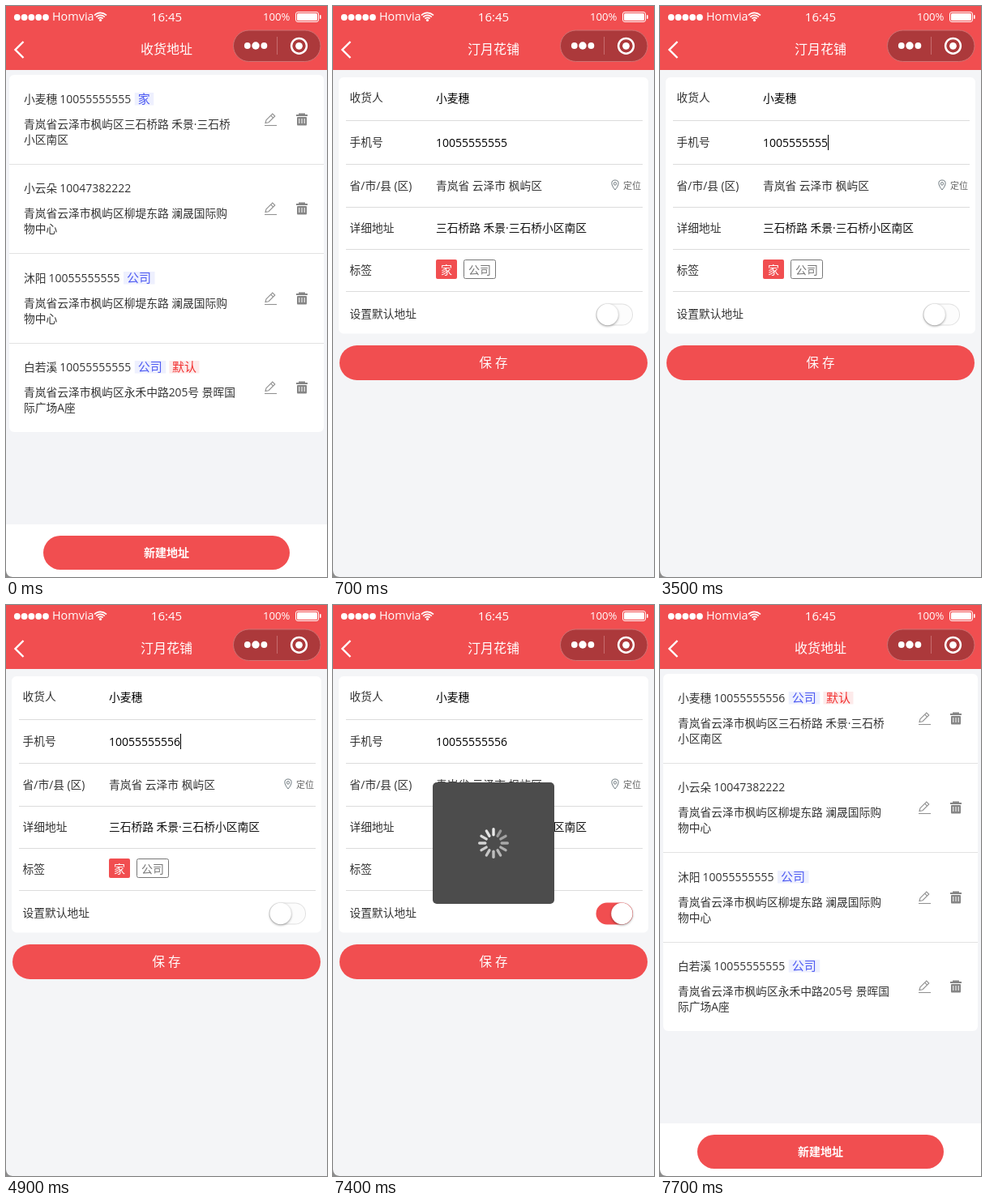
Recreate the animation shown at these times as an HTML page with a canvas. Size 396 px wide and 705 px high, loop 8000 ms.

```html
<!DOCTYPE html>
<html lang="zh-CN">
<head>
<meta charset="utf-8">
<title>收货地址</title>
<style>
html, body { margin: 0; width: 100%; height: 100%; overflow: hidden; }
canvas { display: block; width: 396px; height: 705px; }
</style>
</head>
<body>
<canvas id="stage"></canvas>
<script>
const W = 396, H = 705, LOOP = 8000;
const RED = '#f14e50', INK = '#333', PAPER = '#f3f4f7';
const FONT = '"Open Sans", "Noto Sans CJK SC", "Noto Sans CJK", sans-serif';
const canvas = document.getElementById('stage');
const dpr = window.devicePixelRatio || 1;
canvas.width = W * dpr;
canvas.height = H * dpr;
const c = canvas.getContext('2d');

const REGION = ['青岚省', '云泽市', '枫屿区'];
const AREA = REGION.join('');
const PHONE = '1005555555', OLD = PHONE + '5', NEW = PHONE + '6';

// cy is the optical middle of the line
function text(s, x, cy, size, color = INK, align = 'left', weight = 400) {
  c.font = `${weight} ${size}px ${FONT}`;
  c.textAlign = align;
  c.fillStyle = color;
  c.fillText(s, x, cy + size * 0.37);
}

function rect(x, y, w, h, color) {
  c.fillStyle = color;
  c.fillRect(x, y, w, h);
}

function round(x, y, w, h, r, fill, stroke) {
  c.beginPath();
  c.roundRect(x, y, w, h, r);
  if (fill) { c.fillStyle = fill; c.fill(); }
  if (stroke) { c.strokeStyle = stroke; c.lineWidth = 1; c.stroke(); }
}

function dot(x, y, r, color) {
  c.beginPath();
  c.arc(x, y, r, 0, Math.PI * 2);
  c.fillStyle = color;
  c.fill();
}

function line(points, color, width) {
  c.beginPath();
  points.forEach(([x, y], i) => i ? c.lineTo(x, y) : c.moveTo(x, y));
  c.strokeStyle = color;
  c.lineWidth = width;
  c.stroke();
}

function statusBar() {
  for (let i = 0; i < 5; i++) dot(13.8 + i * 8.8, 14, 3.9, '#fff');
  text('Homvia', 57, 12.8, 14.4, '#fff');
  c.strokeStyle = '#fff';
  c.lineWidth = 1.7;
  for (const r of [4.2, 7.2, 10.2]) {
    c.beginPath();
    c.arc(116.5, 18.5, r, -Math.PI * 0.76, -Math.PI * 0.24);
    c.stroke();
  }
  dot(116.5, 17.5, 1.6, '#fff');
  text('16:45', 198, 13, 15, '#fff', 'center');
  text('100%', 317, 13.2, 13.2, '#fff');
  round(357.5, 7.5, 28, 12, 2.5, null, '#fff');
  round(359, 9, 25, 9, 1.5, '#fff');
  round(387, 11, 1.6, 5, 0.8, '#fff');
}

function header(title) {
  rect(0, 0, W, 79, RED);
  statusBar();
  line([[21.5, 44], [11.5, 54], [21.5, 64]], '#fff', 2.4);
  text(title, 198, 53.5, 16, '#fff', 'center');
  round(280.5, 30, 107.5, 38.5, 19.2, '#ac393b', '#cf7172');
  dot(297.8, 49, 3.9, '#fff');
  dot(308, 49, 4.7, '#fff');
  dot(318.4, 49, 3.9, '#fff');
  rect(334, 38, 1, 22, '#c66d6e');
  c.beginPath();
  c.arc(361.5, 49.3, 9.4, 0, Math.PI * 2);
  c.strokeStyle = '#fff';
  c.lineWidth = 2.5;
  c.stroke();
  dot(361.5, 49.3, 4.4, '#fff');
}

function pencil(x, y) {
  const g = '#929292';
  line([[x - 7, y + 7.5], [x + 8, y + 7.5]], g, 1.1);
  c.beginPath();
  c.moveTo(x - 6, y + 4.5);
  c.lineTo(x - 5, y + 0.8);
  c.lineTo(x + 2.8, y - 7);
  c.lineTo(x + 5.8, y - 4);
  c.lineTo(x - 2, y + 3.7);
  c.closePath();
  c.stroke();
  line([[x + 0.6, y - 4.8], [x + 3.6, y - 1.8]], g, 1.1);
}

function trash(x, y) {
  const g = '#858585';
  rect(x - 4, y - 7.5, 8, 2, g);
  rect(x - 7, y - 6, 14, 2, g);
  round(x - 6, y - 3, 12, 10.5, 1, g);
  for (const d of [-3.2, 0, 3.2]) rect(x + d - 0.5, y - 1, 1, 6, '#fff');
}

function badge(s, x, y) {
  const hot = s === '默认';
  const w = hot ? 37 : s.length * 15 + 8.5;
  rect(x, y - 8, w, 15.5, hot ? '#fdeaea' : '#eef0fe');
  text(s, x + (hot ? 3.5 : 4), y - 0.5, 15, hot ? '#f23232' : '#4f5cf2');
}

function listPage(saved) {
  const rows = [
    ['小麦穗', saved ? NEW : OLD, saved ? ['公司', '默认'] : ['家'],
      AREA + '三石桥路 禾景·三石桥', '小区南区'],
    ['小云朵', '10047382222', [], AREA + '柳堤东路 澜晟国际购', '物中心'],
    ['沐阳', OLD, ['公司'], AREA + '柳堤东路 澜晟国际购', '物中心'],
    ['白若溪', OLD, saved ? ['公司'] : ['公司', '默认'],
      AREA + '永禾中路205号 景晖国', '际广场A座']
  ];
  rect(0, 79, W, H - 79, PAPER);
  round(4, 85, 388, 441, 6, '#fff');
  rows.forEach(([name, phone, tags, first, second], i) => {
    const top = 85 + i * 110.4, y = Math.round(top);
    if (i) rect(4, Math.floor(top), 388, 1, '#e2e2e2');
    text(name, 22, y + 30, 13.75);
    const px = 25 + name.length * 13.75;
    text(phone, px, y + 29.5, 14);
    tags.forEach((s, k) => badge(s, px + 92.5 + k * 42.7, y + 30));
    text(first, 22, y + 60.5, 13.75);
    text(second, 22, y + 79.5, 13.75);
    pencil(326, y + 55);
    trash(365, y + 55);
  });
  rect(0, 640, W, 65, '#fff');
  round(46, 654, 304, 42, 21, RED);
  text('新建地址', 198, 675, 14, '#fff', 'center', 700);
}

function pin(x, y) {
  c.beginPath();
  c.moveTo(x, y + 6);
  c.bezierCurveTo(x - 6, y - 1, x - 5, y - 6, x, y - 6);
  c.bezierCurveTo(x + 5, y - 6, x + 6, y - 1, x, y + 6);
  c.strokeStyle = '#6f7a80';
  c.lineWidth = 1;
  c.stroke();
  c.beginPath();
  c.arc(x, y - 1.6, 1.7, 0, Math.PI * 2);
  c.stroke();
}

function choice(s, x, w, on) {
  if (on) round(x, 313, w, 24, 2, RED);
  else round(x + 0.5, 313.5, w - 1, 23, 2, '#fff', '#777');
  text(s, x + w / 2, 325.5, 14, on ? '#fff' : '#777', 'center');
}

function toggle(p) {
  const on = p > 0;
  round(324.5, 367.5, 45.5, 27, 13.5, on ? RED : '#e0e0e0');
  if (p < 1) {
    const k = 1 - p;
    c.save();
    c.translate(347.25, 381);
    c.scale(k, k);
    round(-21.8, -12.6, 43.6, 25.2, 12.6, '#fcfcfc');
    c.restore();
  }
  c.save();
  c.shadowColor = 'rgba(0,0,0,.4)';
  c.shadowBlur = 3 * dpr;
  c.shadowOffsetY = dpr;
  dot(338.7 + p * 17.7, 381, 13.2, '#fff');
  c.restore();
}

function formPage({ phone, caret, office, knob }) {
  rect(0, 79, W, H - 79, '#f4f5f7');
  round(7, 88, 382, 316.5, 6, '#fff');
  const rows = [['收货人', 113], ['手机号', 168], ['省/市/县 (区)', 222],
    ['详细地址', 274], ['标签', 326], ['设置默认地址', 379.5]];
  for (const [s, y] of rows) text(s, 20.6, y, 13.75);
  for (const y of [141, 195, 248, 300, 352]) rect(16, y, 366, 1, '#dcdcdc');
  text('小麦穗', 127, 114, 13.75, '#000');
  text(phone, 127, 168.5, 14, '#000');
  if (caret) rect(127 + phone.length * 8, 159, 1, 19, '#000');
  text(REGION.join(' '), 127, 222, 13.75);
  text('三石桥路 禾景·三石桥小区南区', 127, 273.5, 13.75, '#111');
  pin(348, 221);
  text('定位', 358, 222, 11, '#666');
  choice('家', 127, 26, !office);
  choice('公司', 161, 40, office);
  toggle(knob);
  round(8, 419, 380, 43, 21.5, RED);
  text('保 存', 198, 440.5, 15.5, '#fff', 'center');
}

function loading(turn) {
  round(123, 219, 150, 150, 5, '#4c4c4c');
  c.save();
  c.translate(198, 294);
  for (let i = 0; i < 12; i++) {
    const v = i ? 146 + i * 7.3 : 233;
    c.save();
    c.rotate((i + turn) * Math.PI / 6);
    round(-1.7, -19, 3.4, 10.5, 1.7, `rgb(${v},${v},${v})`);
    c.restore();
  }
  c.restore();
}

function state(t) {
  const inside = (a, b) => t >= a && t < b;
  return {
    phone: t < 3500 ? OLD : t < 4000 ? PHONE : NEW,
    caret: inside(2200, 2700) || inside(3200, 3900) ||
      inside(4000, 4500) || inside(4900, 5400),
    office: t >= 5700,
    knob: t < 6500 ? 0 : t < 6600 ? 0.32 : t < 6700 ? 0.84 : 1,
    // left edge of the form page while it is pushed in and popped out
    shift: t < 600 || t >= 7600 ? W : t < 700 ? 267 : t < 7500 ? 0 : 200,
    editing: inside(600, 7500),
    busy: inside(500, 700) || inside(7300, 7500),
    saved: t >= 7700
  };
}

function draw(t) {
  const s = state(t);
  c.setTransform(dpr, 0, 0, dpr, 0, 0);
  if (s.shift) listPage(s.saved);
  if (s.shift < W) {
    c.save();
    c.translate(s.shift, 0);
    formPage(s);
    c.restore();
  }
  header(s.editing ? '汀月花铺' : '收货地址');
  if (s.busy) loading(Math.floor(t / 100) - 74);
  // bottom-left corner of the device
  c.beginPath();
  c.moveTo(0, H - 8);
  c.quadraticCurveTo(0.5, H - 0.5, 8, H);
  c.lineTo(0, H);
  c.fillStyle = '#8c8c8c';
  c.fill();
}

const start = performance.now();
function tick() {
  draw((performance.now() - start) % LOOP);
  requestAnimationFrame(tick);
}
tick();
</script>
</body>
</html>
```
